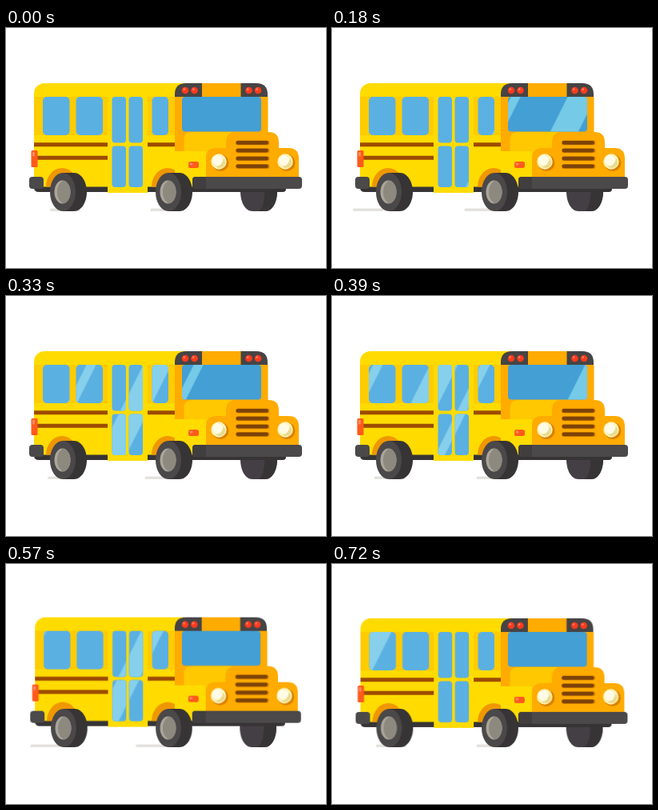
An HTML page that plays this animation: 400 px wide and 300 px high, repeating every 0.75 s.

```html
<!DOCTYPE html>
<html lang="en">
<head>
<meta charset="utf-8">
<title>School bus</title>
<style>
  html, body { margin: 0; width: 100%; height: 100%; overflow: hidden; background: #fff; }
  svg { display: block; width: 400px; height: 300px; }
  .squeeze, .lift, .glints, .streak { animation: 750ms linear infinite; }
  .squeeze { transform-origin: 200px 229px; animation-name: squeeze; }
  .lift { animation-name: lift; }
  .glints { animation-name: sweep; }
  .rear { animation-name: rear; }
  .front { animation-name: front; }

  @keyframes sweep { to { transform: translateX(-615px); } }
  @keyframes lift {
    0%, 100% { transform: none; }
    68% { transform: none; animation-timing-function: cubic-bezier(.39, .575, .565, 1); }
    84% { transform: translateY(-3.2px); animation-timing-function: cubic-bezier(.47, 0, .745, .715); }
  }
  @keyframes squeeze {
    0%, 100% { transform: none; }
    68% { transform: none; animation-timing-function: cubic-bezier(.39, .575, .565, 1); }
    84% { transform: scaleX(.99); animation-timing-function: cubic-bezier(.47, 0, .745, .715); }
  }
  @keyframes rear {
    0%, 46%, 96%, 100% { transform: none; }
    16%, 32% { transform: translateX(-22px); }
    24%, 72% { transform: translateX(-29px); }
    52% { transform: translateX(-2px); }
    68% { transform: translateX(-28px); }
    84% { transform: translateX(-16px); }
  }
  @keyframes front {
    0%, 50%, 54%, 96%, 100% { transform: none; }
    16% { transform: translateX(-9px); }
    32% { transform: translateX(-21px); }
    68% { transform: translateX(-11px); }
    78% { transform: translateX(-20px); }
    84% { transform: translateX(-8px); }
  }
</style>
</head>
<body>
<svg viewBox="0 0 400 300">
  <defs>
    <g id="stripes">
      <path d="M372 86h12l-60 120h-12z"/>
      <path d="M443 86h35l-60 120h-35z"/>
      <path d="M506 86h12l-60 120h-12z"/>
      <path d="M637 86h28l-60 120h-28z"/>
      <path d="M372 86h12l2-4h-12zM443 86h35l2-4h-35zM506 86h12l2-4h-12zM637 86h28l2-4h-28z"/>
    </g>
    <clipPath id="side">
      <rect x="46" y="86" width="33.5" height="48" rx="5"/>
      <rect x="87.5" y="86" width="33.5" height="48" rx="5"/>
      <rect x="182.500" y="86" width="20.500" height="48" rx="5"/>
      <rect x="132.500" y="86" width="17.500" height="57.500" rx="4"/>
      <rect x="153.500" y="86" width="17.500" height="57.500" rx="4"/>
      <rect x="132.500" y="147.500" width="17.500" height="51.500" rx="4"/>
      <rect x="153.500" y="147.500" width="17.500" height="51.500" rx="4"/>
    </clipPath>
    <clipPath id="shield"><rect x="220" y="86" width="99" height="43.500" rx="4"/></clipPath>
    <clipPath id="hub"><ellipse cx="70.500" cy="205" rx="10" ry="14.500"/></clipPath>
    <g id="wheel">
      <path d="M71 181h14c9 0 16 11 16 24s-7 24-16 24H71z" fill="#373435"/>
      <ellipse cx="71" cy="205" rx="16" ry="24" fill="#4b484a"/>
      <g clip-path="url(#hub)">
        <path d="M60 190h22v30H60z" fill="#aaa69b"/>
        <ellipse cx="74" cy="205" rx="10" ry="14.500" fill="#8d897f"/>
      </g>
    </g>
    <g id="lamp">
      <circle r="4.300" fill="#ff3b1d"/>
      <circle cx="-1.300" cy="-1.400" r="1.300" fill="#ff8068"/>
    </g>
    <g id="headlight">
      <circle cx="2" cy="1.500" r="10.500" fill="#d98200"/>
      <circle r="9.700" fill="#fff3b8"/>
      <circle cx="-1.500" cy="-1.500" r="6.500" fill="#fffbe6"/>
      <path d="M6-4a7 7 0 0 1-10 10q8 0 10-10z" fill="#eadb8d"/>
    </g>
    <g id="bar">
      <rect x="287" y="140.500" width="42.500" height="6" rx="3" fill="#dc8500"/>
      <rect x="287.500" y="141" width="40.500" height="4.800" rx="2.400" fill="#7c4309"/>
    </g>
  </defs>

  <rect class="streak rear" x="55" y="225.500" width="38" height="3.500" rx="1.500" fill="#e4e2de"/>
  <rect class="streak front" x="180.500" y="225.500" width="38" height="3.500" rx="1.500" fill="#e4e2de"/>

  <g class="squeeze">
    <path d="M293 196h46v8c0 14-6 25-15 25h-16c-9 0-15-11-15-25z" fill="#443f45"/>
    <path d="M323 196h16v8c0 14-6 25-15 25h-8c6-5 8-16 7-33z" fill="#373435"/>

    <g class="lift">
      <path d="M35 194h315v7q0 4-4 4H41q-6 0-6-6z" fill="#373435"/>
      <path d="M35 198.500V82a13 13 0 0 1 13-13h202v129.500z" fill="#ffdb00"/>
      <path d="M35 86h176v48H35z" fill="#ffcc00"/>
      <path d="M35 143.200h176v5H35zM35 159.700h92v5H35z" fill="#9d4b00"/>
      <path d="M127 86h50v120h-50z" fill="#ffdb00"/>

      <g fill="#ef9700">
        <path d="M50 198.500a20 23.500 0 0 1 40 0z"/>
        <path d="M182 198.500a20 23.500 0 0 1 40 0z"/>
      </g>

      <g clip-path="url(#side)">
        <path d="M40 80h170v125H40z" fill="#5bb0e2"/>
        <use href="#stripes" class="glints" fill="#86d0ec"/>
      </g>

      <path d="M211 86h116.500v55H240v13h-29z" fill="#ffab00"/>
      <path d="M211 154V86h9v44z" fill="#ffab00"/>
      <path d="M211.500 154h11v-14q0-10 10-10h50v56h-33z" fill="#ffc800"/>
      <path d="M211 154h39v32h-39z" fill="#ffdb00"/>
      <path d="M211 86V83q0-14 14-14h88q14 0 14 14v3z" fill="#464445"/>
      <path d="M245 69h48.500v18H245z" fill="#ffab00"/>
      <use href="#lamp" x="224" y="78"/>
      <use href="#lamp" x="235.500" y="78"/>
      <use href="#lamp" x="303.500" y="78"/>
      <use href="#lamp" x="315" y="78"/>
      <g clip-path="url(#shield)">
        <path d="M219 85h101v46H219z" fill="#439fd4"/>
        <use href="#stripes" class="glints" fill="#75cae8"/>
      </g>

      <path d="M250 187v-24q0-13 13-13h12v-7q0-13 13-13h40q13 0 13 13v7h12q13 0 13 13v24z" fill="#ffab00"/>
      <use href="#bar"/>
      <use href="#bar" y="9.700"/>
      <use href="#bar" y="19.700"/>
      <use href="#bar" y="29.400"/>
      <use href="#headlight" x="266" y="167"/>
      <use href="#headlight" x="349" y="167"/>

      <rect x="228" y="167" width="13" height="8" rx="2.500" fill="#ff5a1c"/>
      <rect x="229.500" y="168.500" width="4" height="3" rx="1.500" fill="#ff8d62"/>
      <rect x="31.500" y="153" width="8" height="21" rx="1.500" fill="#ff5a1c"/>
      <rect x="33" y="154.500" width="3" height="6" rx="1.500" fill="#ff8d62"/>
      <rect x="29" y="186" width="18" height="15" rx="4" fill="#4b494a"/>
    </g>

    <use href="#wheel"/>
    <use href="#wheel" x="132"/>

    <g class="lift">
      <rect x="233" y="186" width="137" height="15" rx="4" fill="#4b494a"/>
      <path d="M250 186v15h-13q-4 0-4-4v-7q0-4 4-4z" fill="#403e3f"/>
    </g>
  </g>
</svg>
</body>
</html>
```
